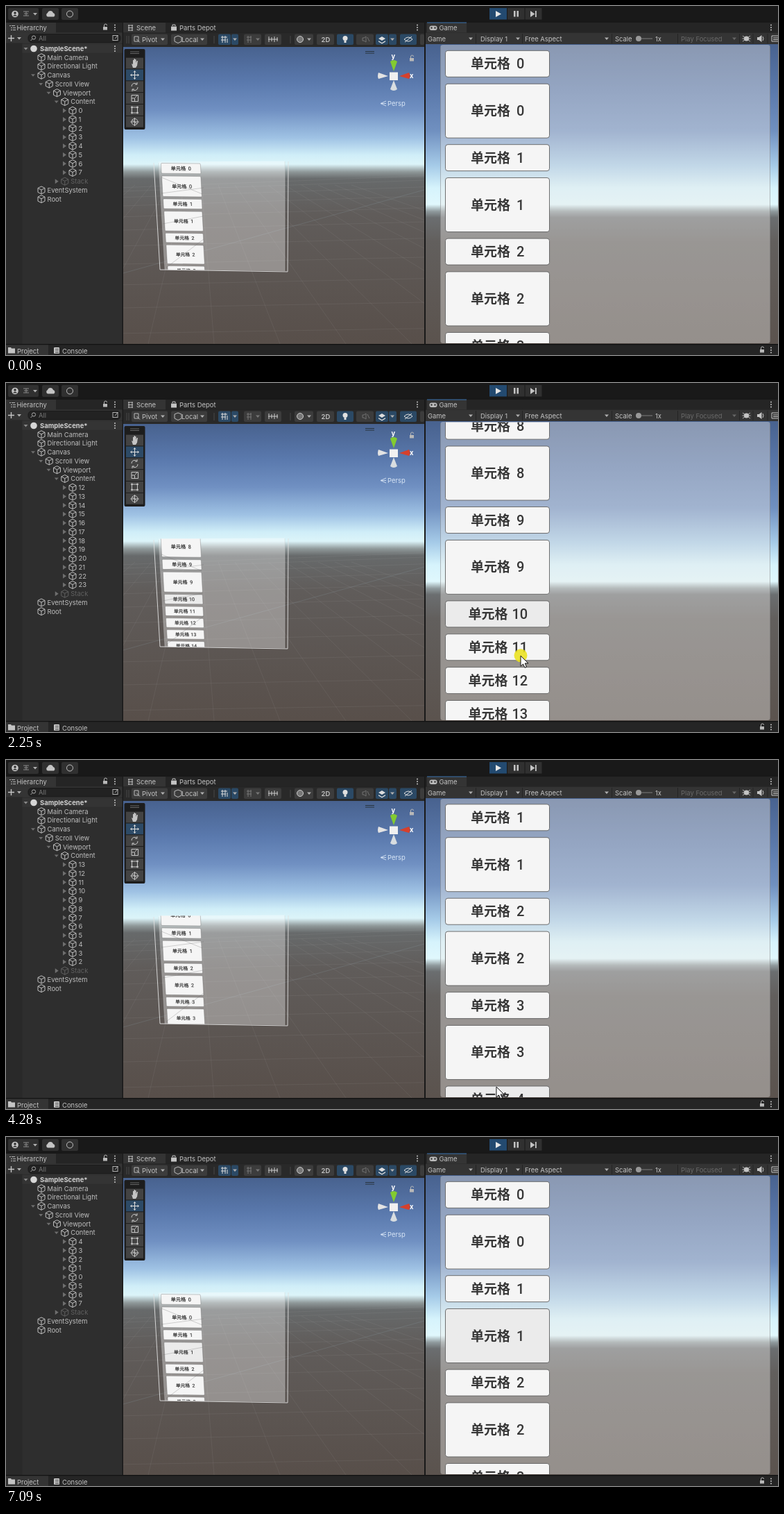
An HTML page for the animation above (7.19 s loop, 1113x503 px).

```html
<!DOCTYPE html>
<html lang="en">
<head>
<meta charset="utf-8">
<title>Recycled list</title>
<style>
html, body { margin: 0; width: 100%; height: 100%; overflow: hidden; background: #191919; }
svg { display: block; width: 1113px; height: 503px; font: 9.45px Inter, "Liberation Sans", sans-serif; }
.cell text { font: 700 19px "Noto Sans CJK SC", "Noto Sans CJK", sans-serif; fill: #363636; }
.cell .num { font: 500 20px Roboto, sans-serif; }
</style>
</head>
<body>
<svg id="stage" viewBox="0 0 1113 503" xmlns="http://www.w3.org/2000/svg"></svg>
<script>
const LOOP = 7190, COUNT = 30, PAIR = 135.4, SMALL = 47.86, TOP = 64.3;
const VIEW_TOP = 56, VIEW_BOTTOM = 486, CELL_LEFT = 633.5, CELL_WIDTH = 150;
const stage = document.getElementById('stage');
const range = n => [...Array(n).keys()];

// ---- drawing helpers ----
const rect = (x, y, w, h, fill, extra = '') =>
  `<rect x="${x}" y="${y}" width="${w}" height="${h}" fill="${fill}" ${extra}/>`;
const label = (x, y, str, fill = '#c4c4c4', extra = '') =>
  `<text x="${x}" y="${y + 3.5}" fill="${fill}" ${extra}>${str}</text>`;
const path = (d, stroke = '#c4c4c4', width = 1, opacity = 1) =>
  `<path d="${d}" stroke="${stroke}" stroke-width="${width}" fill="none" opacity="${opacity}"/>`;
const solid = (d, fill = '#c4c4c4') => `<path d="${d}" fill="${fill}"/>`;
const circle = (x, y, r, fill = 'none', stroke = 'none') =>
  `<circle cx="${x}" cy="${y}" r="${r}" fill="${fill}" stroke="${stroke}"/>`;
const down = (x, y, fill = '#b0b0b0') => solid(`M${x - 3} ${y - 1.5}h6l-3 3.5z`, fill);
const right = (x, y, fill) => solid(`M${x - 2} ${y - 3.5}l5 3.5l-5 3.5z`, fill);
const dots = (x, y) => [-3.5, 0, 3.5].map(d => circle(x, y + d, 1, '#c4c4c4')).join('');
const lock = (x, y) => rect(x - 3, y - 1, 6, 4.5, '#b8b8b8') +
  path(`M${x - 1.5} ${y - 1}v-2a2 2 0 0 1 4 0`, '#b8b8b8');
const cube = (x, y, color) =>
  path(`M${x} ${y - 5.5}l5 2.5v6l-5 2.5l-5-2.5v-6zM${x - 5} ${y - 3}l5 2.6l5-2.6M${x} ${y - .4}v6`, color);
const gradient = (id, y1, y2, stops) =>
  `<linearGradient id="${id}" gradientUnits="userSpaceOnUse" x1="0" x2="0" y1="${y1}" y2="${y2}">` +
  stops.map(([y, c]) => `<stop offset="${(y - y1) / (y2 - y1)}" stop-color="${c}"/>`).join('') + '</linearGradient>';

// ---- list layout: ten small/tall pairs, then ten small cells ----
const cellTop = i => TOP + (i < 20 ? (i >> 1) * PAIR + (i % 2) * SMALL : 10 * PAIR + (i - 20) * SMALL);
const cellHeight = i => i < 20 && i % 2 ? 78 : 38;
const cellNumber = i => i < 20 ? i >> 1 : i - 10;

function cellMarkup(i, view) {
  const h = cellHeight(i), n = cellNumber(i), wide = n > 9;
  return `<g class="cell" id="${view}${i}">` +
    rect(0, 0, CELL_WIDTH, h, '#f5f5f5', 'rx="3.5" stroke="#606060" stroke-width=".9"') +
    `<text x="${wide ? 33 : 36.5}" y="${h / 2 + 7}">单元格</text>` +
    `<text class="num" x="${wide ? 96 : 102.5}" y="${h / 2 + 7}">${n}</text></g>`;
}
const cells = view => range(COUNT).map(i => cellMarkup(i, view)).join('');

// ---- static panels ----
function topBar() {
  return rect(0, 0, 1113, 22.5, '#191919') +
    rect(3, 3, 44, 17, '#303030', 'rx="2"') + rect(52, 3, 24, 17, '#303030', 'rx="2"') +
    rect(80, 3, 24, 17, '#303030', 'rx="2"') +
    circle(13, 11.5, 4.8, '#c4c4c4') + circle(13, 10, 1.8, '#303030') + solid('M10 14.5q3-4 6 0z', '#303030') +
    path('M25 8h8M26 11h6M25 14h8M29 8v6', '#8b8b8b') + down(42, 11.5) +
    solid('M60 15.5a3 3 0 0 1 0-5.5a4.2 4.2 0 0 1 8 0a3 3 0 0 1 1 5.5z') +
    circle(92, 11.5, 4.5, 'none', '#c4c4c4') +
    rect(697, 3, 25, 16.5, '#234a70') + rect(723, 3, 24.5, 16.5, '#303030') + rect(748.5, 3, 24, 16.5, '#303030') +
    solid('M706 7l8 4.5l-8 4.5z', '#e6e6e6') + rect(732, 7, 2.5, 8.5, '#c4c4c4') + rect(736.5, 7, 2.5, 8.5, '#c4c4c4') +
    solid('M756 7l6.5 4.5l-6.5 4.5z') + rect(763, 7, 1.8, 9, '#c4c4c4');
}

function hierarchyPanel() {
  return rect(0, 24, 167.5, 463, '#2e2e2e') + rect(0, 24, 167.5, 14.5, '#252525') +
    rect(0, 24, 72, 14.5, '#343434') + rect(0, 38.5, 167.5, 15, '#343434') + rect(0, 53.5, 23.5, 433.5, '#292929') +
    path('M5 28.5h2M8 28.5h5M7 31.5h2M10 31.5h4M7 34.5h2M10 34.5h4', '#b8b8b8', 1.2) +
    label(15.5, 31.5, 'Hierarchy') + lock(143, 31) + dots(157, 31) +
    path('M3 46.5h9M7.5 42v9', '#c4c4c4', 1.4) + down(19, 46.5) +
    rect(32, 40.5, 133, 12, '#222', 'rx="5" stroke="#1a1a1a"') + circle(40, 45.5, 2.6, 'none', '#aaa') +
    path('M38 47.5l-2.5 2.5', '#aaa') + label(47, 46.5, 'All', '#777') +
    rect(154, 42.5, 7, 7, 'none', 'stroke="#b0b0b0"') + path('M157 47l4.5-5', '#b0b0b0') +
    rect(23.5, 55, 144, 12.5, '#343434') + down(28.5, 61.5, '#888') + circle(40, 61.5, 4.8, '#d6d6d6') +
    label(49, 61.5, 'SampleScene*', '#d2d2d2', 'font-weight="700"') + dots(157, 61.5);
}

function treeRow(depth, y, name, arrow, color) {
  const x = 51 + depth * 11.25;
  return (arrow === 'open' ? down(x - 12, y, '#6e6e6e') : arrow === 'shut' ? right(x - 12, y, '#6e6e6e') : '') +
    cube(x, y, color) + label(x + 8.5, y, name, color);
}

function treeMarkup(list) {
  const rows = [[0, 'Main Camera'], [0, 'Directional Light'], [0, 'Canvas', 'open'], [1, 'Scroll View', 'open'],
    [2, 'Viewport', 'open'], [3, 'Content', 'open'], ...list.map(i => [4, i, 'shut']),
    [3, 'Stack', 'shut', '#606060'], [0, 'EventSystem'], [0, 'Root']];
  return rows.map(([depth, name, arrow, color = '#bebebe'], i) =>
    treeRow(depth, 74.2 + i * 12.75, name, arrow, color)).join('');
}

function sceneBar() {
  const button = (x, w, on) => rect(x, 40.5, w, 15.5, on ? '#2b4965' : '#3c3c3c', 'rx="2"');
  return rect(169, 24, 434, 14.5, '#252525') + rect(169, 24, 61, 14.5, '#343434') + rect(169, 38.5, 434, 20.5, '#292929') +
    path('M176 28h7M176 31.5h7M176 35h7M177 27v9M182 27v9', '#bbb') + label(188, 31.5, 'Scene') +
    solid('M238 29.5h8v6h-8z') + path('M240 29v-2h4v2') + label(250, 31.5, 'Parts Depot') + dots(593, 31) +
    path('M174 43v11M177 43v11M300 43v11M410 43v11', '#484848') +
    button(181, 52) + path('M185 44h6v7h-6zM188 47.5l5 5', '#bbb') + label(196, 48, 'Pivot') + down(226, 48) +
    button(238, 52) + path('M243 45l5-2l5 2v6l-5 2.5l-5-2.5z', '#bbb') + label(253, 48, 'Local') + down(283, 48) +
    button(306, 18, true) + button(325, 10, true) +
    path('M310 45h9M310 49h7M312 43v10M316 43v10M319 47v6', '#ddd') + down(330, 48) +
    button(343, 25) + path('M347 45h7M347 49h7M349 43v10M353 43v10', '#777') + down(363, 48, '#777') +
    button(373, 24) + path('M378 48h14M379 44v8M383 45v6M387 44v8M391 45v6', '#ccc') +
    button(416, 27) + circle(424, 48, 4.5, '#777', '#ccc') + down(437, 48) +
    button(448, 25) + label(454.5, 48, '2D', '#c4c4c4', 'font-weight="600"') +
    button(477, 24, true) + circle(489, 46.5, 3.5, '#e0e0e0') + rect(487.5, 50, 3, 3, '#e0e0e0') +
    button(505, 25) + path('M514 46h2l3-2v8l-3-2h-2zM521 45l3 6', '#707070') +
    button(533, 18, true) + button(552, 11, true) +
    solid('M537 47l5-3l5 3l-5 3zM537 50l5 3l5-3v1.5l-5 3l-5-3z', '#ddd') + down(557, 48) +
    button(568, 24, true) + path('M574 48q6-6 12 0q-6 6-12 0M575 52l10-8', '#ddd') + button(597, 6);
}

function sceneTools() {
  const buttons = range(6).map(i => rect(173, 74.6 + i * 16.85, 25, 15.8, i === 1 ? '#2d4a66' : '#434343')).join('');
  return rect(170.5, 62, 30, 116, '#1d1d1d', 'rx="2"') + path('M179 66h13M179 68.5h13', '#777', .8) + buttons +
    solid('M181 83l2 1v-6h1.5v4v-6h1.5v6v-5h1.5v5l1-3h1.5l-1 7l-2 3h-4z') +
    path('M185.5 94v11M180 99.5h11M184 95.5l1.5-2l1.5 2M184 103.5l1.5 2l1.5-2M181.5 98l-2 1.5l2 1.5M189.5 98l2 1.5l-2 1.5', '#ddd') +
    path('M181 116a4.5 4.5 0 0 1 8-3M190 117a4.5 4.5 0 0 1-8 3M189 110v3h-3M182 123v-3h3') +
    path('M181 128.5h9.5v9h-9.5zM181 133h4.5v4.5M186 132l3-3') + path('M181.5 146h8v8h-8z') +
    range(4).map(i => circle(181.5 + i % 2 * 8, 146 + (i >> 1) * 8, 1.4, '#c4c4c4')).join('') +
    circle(185.5, 167, 4.5, 'none', '#c4c4c4') + path('M185.5 161v12M179.5 167h12M182 164l7 6');
}

function sceneGizmo() {
  return path('M518 65.5h13M518 68h13', '#28343f') +
    solid('M551 101l-14-5q-2 5 0 9z', '#e3e3e3') + solid('M567 101l14-5q3 5 0 9z', '#d5402c') +
    solid('M559 94l-5-14q5-4 10 0z', '#83cb30') + solid('M559 107l-5 13q5 4 10 0z', '#d8dde0') +
    rect(553, 95.5, 12, 11.5, '#f0f0f0') + label(555.5, 72.5, 'y', '#fff', 'font-weight="700"') +
    label(582, 100, 'x', '#fff', 'font-weight="700"') + lock(585, 76) +
    path('M548 137l-8 3.5l8 3.5M548 140.5h-7', '#d7e5f5', .9) + label(550, 140.5, 'Persp', '#d7e5f5');
}

function floorGrid() {
  const rays = range(15).map(i => `M${162 + i * 24} 258L${i * 95 - 175} 487`);
  const rows = range(11).map(i => `M169 ${261.75 + 1.75 * i * (i + 2)}L603 ${244.75 + 1.75 * i * (i + 2) + i}`);
  return path(rays.concat(rows).join(''), '#b9b9b9', .7, .14) + path('M169 385L603 265', '#9fb1bd', .7, .25) +
    path('M567 238.5h8', '#6d9c45', 1, .6);
}

function scenePanel() {
  return rect(169, 59, 434, 428, 'url(#sceneSky)') + `<g clip-path="url(#sceneBox)">${floorGrid()}</g>` +
    solid('M220 224.5L402 223.5V382L229 380z', 'rgba(255,255,255,.34)') +
    `<g clip-path="url(#miniBox)">${cells('mini')}</g>` +
    path('M224 247L283 271M224 270L285 262M226 314L284 303M231 377L285 336', '#666', .7, .4) +
    path('M213 226L222 380L406 383L407 224', '#e2e2e2', 1, .9) +
    path('M402 224V382M220 226L229 380', '#c8c8c8', .7, .5) +
    sceneBar() + sceneTools() + sceneGizmo();
}

function gamePanel() {
  const dividers = [677.5, 744.5, 873.5, 968.5, 1057.5, 1077, 1098].map(x => `M${x} 40v14`).join('');
  return rect(605, 24, 508, 14.5, '#252525') + rect(607, 24, 57, 14.5, '#343434') + rect(607, 23.5, 57, 1, '#3a72b0') +
    rect(605, 38.5, 508, 16.5, '#343434') +
    rect(610.5, 28.5, 11, 6.5, '#bbb', 'rx="3"') + circle(613.5, 31.5, 1.2, '#333') + circle(618.5, 31.5, 1.2, '#333') +
    label(624.5, 31.5, 'Game') + dots(1103, 31) +
    label(608, 47, 'Game') + down(670, 47) + label(684, 47, 'Display 1') + down(738, 47) +
    label(748, 47, 'Free Aspect') + down(866, 47) + label(878, 47, 'Scale') +
    path('M908 47h24', '#666', 1.5) + circle(912, 47, 4, '#999') + label(936, 47, '1x') +
    label(973, 47, 'Play Focused', '#6a6a6a') + down(1050, 47, '#666') + path(dividers, '#242424') +
    circle(1067.5, 47, 3.6, '#c4c4c4') + path('M1062 43l11 8M1062 51l11-8M1061.5 47h12', '#c4c4c4', .9) +
    solid('M1083 45h2.5l4-3v10l-4-3h-2.5z') + path('M1091 44q2 3 0 6') +
    path('M1104 43h9M1104 43v8h9M1106 46h7M1106 48.5h7') +
    rect(605, 55, 508, 432, 'url(#gameSky)') + rect(626, 56, 476, 430, 'rgba(235,232,230,.4)', 'rx="4"') +
    path('M626.5 58V484M1101.5 58V484', '#555', .7, .5) +
    `<g clip-path="url(#gameBox)">${cells('game')}</g>`;
}

function bottomBar() {
  return rect(0, 487, 1113, 1.5, '#141414') + rect(0, 488.5, 1113, 15, '#252525') + rect(0, 488.5, 61, 15, '#343434') +
    solid('M3 492h4l1 1.5h5v7H3z') + label(16, 497, 'Project') +
    rect(69, 492, 8, 9, '#c4c4c4', 'rx="1"') + path('M71 494.5h5M71 497h5M71 499.5h5', '#333', .8) + label(81, 497, 'Console') +
    lock(1090, 496) + dots(1103, 496);
}

stage.innerHTML = '<defs>' +
  gradient('sceneSky', 59, 487, [[59, '#48628f'], [110, '#5a79ad'], [150, '#7090c2'], [190, '#9fc2e4'], [215, '#d0eef8'],
    [228, '#dcf4f9'], [239, '#8f9899'], [249, '#676a6b'], [300, '#605c5a'], [487, '#584f4a']]) +
  gradient('gameSky', 55, 487, [[55, '#48628f'], [120, '#5a78aa'], [180, '#7090c0'], [230, '#a6cbe8'], [262, '#d6f3fc'],
    [286, '#e0f8fd'], [296, '#8f9a9d'], [305, '#6b6e70'], [340, '#625f5d'], [487, '#5b534e']]) +
  '<clipPath id="sceneBox"><rect x="169" y="240" width="434" height="247"/></clipPath>' +
  '<clipPath id="miniBox"><path d="M218 224.5H403V382L222 380z"/></clipPath>' +
  '<clipPath id="gameBox"><rect x="626" y="56.5" width="476" height="429.5"/></clipPath></defs>' +
  rect(0, 0, 1113, 503, '#191919') + topBar() + hierarchyPanel() + '<g id="tree"></g>' +
  scenePanel() + gamePanel() + bottomBar() +
  '<circle id="press" r="9.5" fill="#ebe11e" opacity=".88"/>' +
  '<path id="pointer" d="M0 0V15L3.5 11.8L6 17L8.5 16L6.2 10.8H11z" fill="#fff" stroke="#111" stroke-linejoin="round"/>';

// ---- motion ----
const clamp = u => Math.max(0, Math.min(1, u));
const ease = u => u * u * (3 - 2 * u);

// Where each fling, bounce and pull of the list turns.
const scrollKeys = [[880, 0], [1600, 444], [1720, 450], [2600, 1440], [2770, 1413.5], [2800, 1408.5], [3000, 1475],
  [3250, 1409], [3480, 1409], [3640, 1294], [4540, -90], [4800, 0], [4960, -54], [5270, -155], [5800, 0]];

// Cubic through the keys without overshoot.
function scrollAt(t) {
  const keys = scrollKeys, last = keys.length - 1;
  if (t <= keys[0][0]) return keys[0][1];
  if (t >= keys[last][0]) return keys[last][1];
  const i = keys.findIndex(key => key[0] > t) - 1;
  const slope = j => j < 0 || j >= last ? 0 : (keys[j + 1][1] - keys[j][1]) / (keys[j + 1][0] - keys[j][0]);
  const tangent = j => { const a = slope(j - 1), b = slope(j); return a * b > 0 ? 2 * a * b / (a + b) : 0; };
  const span = keys[i + 1][0] - keys[i][0], u = (t - keys[i][0]) / span, v = 1 - u;
  return keys[i][1] * ease(v) + keys[i + 1][1] * ease(u) + span * u * v * (tangent(i) * v - tangent(i + 1) * u);
}

// Each drag goes straight up or down; the pointer eases from one to the next.
const drags = [[890, 1110, 710, 411, 250], [1700, 1930, 734, 415, 215], [2210, 2410, 742, 415, 215], [2740, 3000, 748, 424, 285],
  [3440, 3760, 713, 125, 473], [4030, 4240, 707, 250, 474], [4800, 5150, 704.5, 285, 542]]
  .map(([start, end, x, from, to]) => ({ start, end, x, from, to }));
const stops = [[150, 1016, 510], ...drags.flatMap(d => [[d.start, d.x, d.from], [d.end, d.x, d.to]]),
  [6020, 945, 443], [6130, 1098, 512]];

function pointerAt(t) {
  const i = stops.findIndex(stop => stop[0] > t);
  if (i < 1) return { x: 0, y: 600 };
  const [t0, x0, y0] = stops[i - 1], [t1, x1, y1] = stops[i], u = ease((t - t0) / (t1 - t0));
  return { x: x0 + (x1 - x0) * u, y: y0 + (y1 - y0) * u };
}

function cellUnder({ x, y }, scroll) {
  if (x < CELL_LEFT || x > CELL_LEFT + CELL_WIDTH || y > VIEW_BOTTOM) return -1;
  return range(COUNT).findIndex(i => y >= cellTop(i) - scroll && y <= cellTop(i) - scroll + cellHeight(i));
}
for (const d of drags) d.cell = cellUnder({ x: d.x, y: d.from }, scrollAt(d.start));

// A held cell darkens; it stays lightly marked until the next press.
function tintOf(i, t, drag, hovered) {
  let drop = i === hovered ? 10 : 0;
  if (drag && drag.cell === i) drop = t < drag.end + 150 ? 24 * clamp((t - drag.start) / 100) : 10;
  const gray = 245 - drop;
  return `rgb(${gray},${gray},${gray})`;
}

// Cells leave the tree a little after they scroll away and rejoin at its end.
const STEP = 20, history = [];
const inRange = (i, scroll) => {
  const y = cellTop(i) - scroll;
  return y + cellHeight(i) > VIEW_TOP && y < VIEW_BOTTOM + 36;
};
for (let t = 0, live = []; t < LOOP; t += STEP) {
  const scroll = scrollAt(t), before = scrollAt(t - 150);
  live = live.filter(i => inRange(i, scroll) || inRange(i, before));
  const fresh = range(COUNT).filter(i => inRange(i, scroll) && !live.includes(i));
  if (scroll < scrollAt(t - STEP)) fresh.reverse();
  live = live.concat(fresh);
  history.push(live);
}

const byId = id => document.getElementById(id);
const tree = byId('tree'), press = byId('press'), pointer = byId('pointer');
const SCENE_LEAD = 27;   // the scene view repaints slightly ahead of the game view
let shownTree = '';

// Perspective of the canvas in the scene view, taken at the cell's centre.
function miniTransform(y, h) {
  const d = y + h / 2 - 83, u = (d + 10.5) / 383, skew = .02;
  const sx = (57 - 3.5 * u) / CELL_WIDTH, sy = .3858 - 1.152e-4 * d;
  const centre = 234 + .3858 * d - 5.76e-5 * d * d;
  return `matrix(${sx} .004 ${skew} ${sy} ${223.5 + 9 * u - skew * h / 2} ${centre - sy * h / 2 - .3})`;
}
const gameTransform = y => `translate(${CELL_LEFT} ${y})`;

const views = [
  { cells: range(COUNT).map(i => byId('game' + i)), lead: 0, transform: gameTransform },
  { cells: range(COUNT).map(i => byId('mini' + i)), lead: SCENE_LEAD, transform: miniTransform }
];

function draw(t) {
  const at = pointerAt(t), drag = drags.filter(d => d.start <= t).pop();
  const held = Boolean(drag) && t < drag.end;
  const hovered = held ? -1 : cellUnder(at, scrollAt(t));
  for (const view of views) {
    const scroll = scrollAt(t + view.lead);
    view.cells.forEach((cell, i) => {
      const h = cellHeight(i), y = cellTop(i) - scroll, visible = y + h > 50 && y < 492;
      cell.style.display = visible ? '' : 'none';
      if (!visible) return;
      cell.setAttribute('transform', view.transform(y, h));
      cell.firstChild.setAttribute('fill', tintOf(i, t, drag, hovered));
    });
  }
  const list = history[Math.floor(t / STEP)], key = list.join();
  if (key !== shownTree) {
    shownTree = key;
    tree.innerHTML = treeMarkup(list);
  }
  pointer.setAttribute('transform', `translate(${at.x} ${at.y})`);
  press.setAttribute('cx', at.x);
  press.setAttribute('cy', at.y - .5);
  press.style.display = held ? '' : 'none';
}

const start = performance.now();
function tick() {
  draw((performance.now() - start) % LOOP);
  requestAnimationFrame(tick);
}
tick();
</script>
</body>
</html>
```
